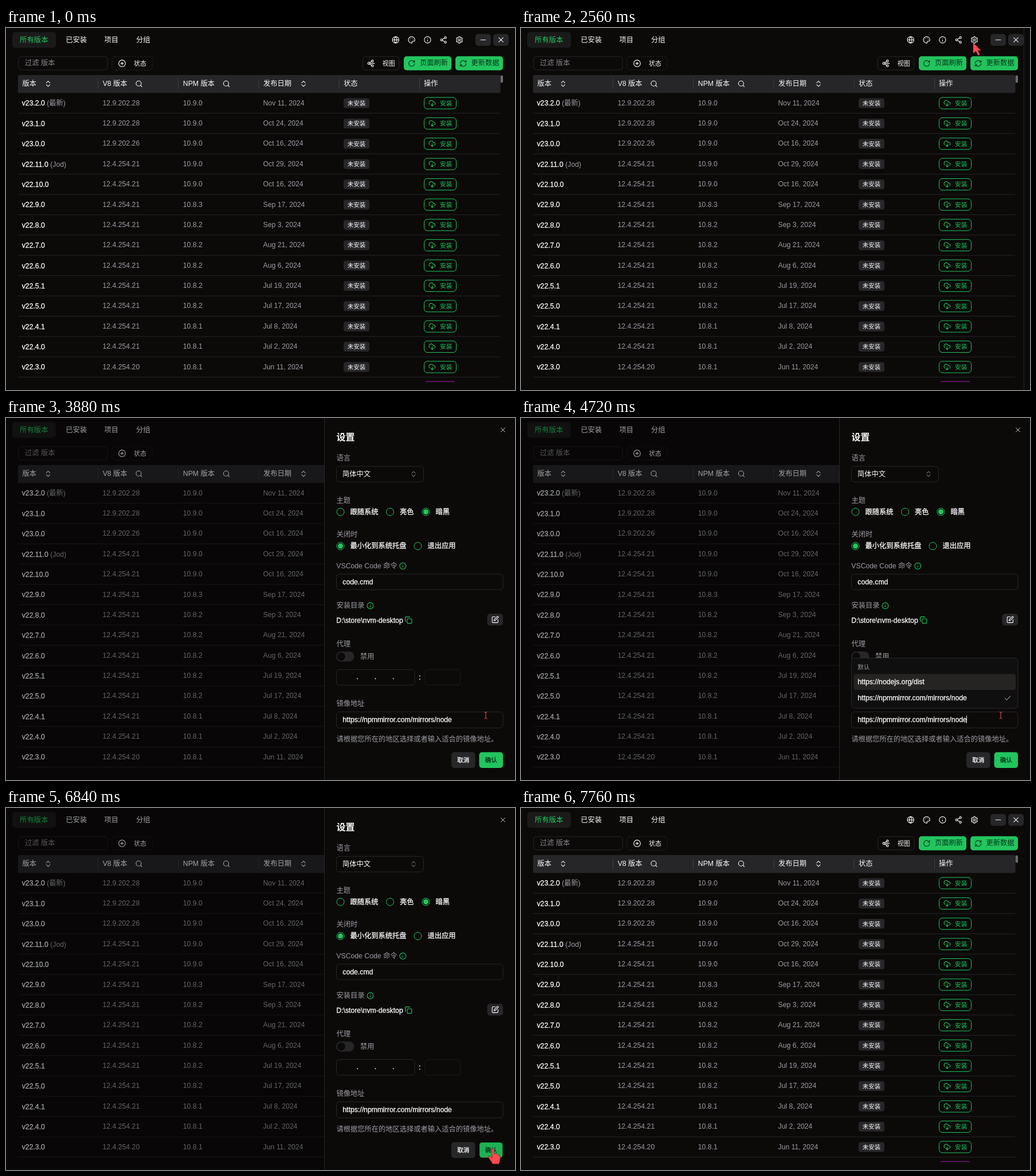
Animation, 888 px wide and 631 px high, one loop 8550 ms. Source, as an HTML page:

```html
<!DOCTYPE html>
<html lang="zh-CN">
<head>
<meta charset="utf-8">
<title>版本管理</title>
<style>
html, body { margin: 0; width: 100%; height: 100%; overflow: hidden; background: #0c0a09; }
svg { display: block; width: 888px; height: 631px; }
text { font-family: "Liberation Sans", "Noto Sans CJK SC", "Noto Sans CJK", sans-serif; white-space: pre; }
.medium { stroke: currentColor; stroke-width: .3px; }
</style>
</head>
<body>
<svg id="stage" viewBox="0 0 888 631" xmlns="http://www.w3.org/2000/svg"></svg>
<script>
const LOOP = 8550, ROW = 35.38, TOP = 113.3;
const BG = '#0c0a09', LINE = '#27272a', GREY = '#9c9ca3', GREEN = '#22c55e', WHITE = '#fafafa', INK = '#07351a';

// Icon outlines on a 24 unit grid
const ICONS = {
  globe: 'M2 12a10 10 0 1 0 20 0a10 10 0 1 0-20 0M2 12h20M12 2a15 15 0 0 0 0 20a15 15 0 0 0 0-20',
  palette: 'M12 2a10 10 0 0 0 0 20c2 0 2.4-1.6 1.5-2.7c-1-1.5 0-3.3 1.7-3.3H18c2.5 0 4-2 4-4.5C22 6 17.5 2 12 2M8 7.5h.1M13.5 6.5h.1M17.5 10.5h.1M6.5 12.5h.1',
  info: 'M2 12a10 10 0 1 0 20 0a10 10 0 1 0-20 0M12 16v-4M12 8h.01',
  share: 'M15 5a3 3 0 1 0 6 0a3 3 0 1 0-6 0M3 12a3 3 0 1 0 6 0a3 3 0 1 0-6 0M15 19a3 3 0 1 0 6 0a3 3 0 1 0-6 0M8.6 13.5l6.8 4M15.4 6.5l-6.8 4',
  gear: 'M10 2h4l.6 3 2 1.1 2.9-1 2 3.5-2.3 2v2.8l2.3 2-2 3.5-2.9-1-2 1.1-.6 3h-4l-.6-3-2-1.1-2.9 1-2-3.5 2.3-2v-2.8l-2.3-2 2-3.5 2.9 1 2-1.1zM9 12a3 3 0 1 0 6 0a3 3 0 1 0-6 0',
  minus: 'M4 12h16',
  cross: 'M5 5l14 14M19 5L5 19',
  plus: 'M2 12a10 10 0 1 0 20 0a10 10 0 1 0-20 0M8 12h8M12 8v8',
  nodes: 'M2 12a3 3 0 1 0 6 0a3 3 0 1 0-6 0M13 5a3 3 0 1 0 6 0a3 3 0 1 0-6 0M13 19a3 3 0 1 0 6 0a3 3 0 1 0-6 0M8 12h14M7 10l7-4M7 14l7 4',
  redo: 'M21 12a9 9 0 1 1-9-9c2.5 0 4.9 1 6.7 2.7L21 8M21 3v5h-5',
  sync: 'M3 12a9 9 0 0 1 9-9a9.75 9.75 0 0 1 6.7 2.7L21 8M21 3v5h-5M21 12a9 9 0 0 1-9 9a9.75 9.75 0 0 1-6.7-2.7L3 16M8 16H3v5',
  sort: 'M6 15l6 6 6-6M6 9l6-6 6 6',
  search: 'M3 11a8 8 0 1 0 16 0a8 8 0 1 0-16 0M21 21l-4.3-4.3',
  cloud: 'M12 12v9M8 17l4 4 4-4M4 14.9A7 7 0 1 1 15.7 8h1.8a4.5 4.5 0 0 1 2.5 8.2',
  copy: 'M10 8h10a2 2 0 0 1 2 2v10a2 2 0 0 1-2 2H10a2 2 0 0 1-2-2V10a2 2 0 0 1 2-2M4 16a2 2 0 0 1-2-2V4a2 2 0 0 1 2-2h10a2 2 0 0 1 2 2',
  edit: 'M12 3H5a2 2 0 0 0-2 2v14a2 2 0 0 0 2 2h14a2 2 0 0 0 2-2v-7M18.4 2.6a2 2 0 0 1 3 3L12.5 14.5l-4 1 1-4z',
  check: 'M3 13l6 6L21 6'
};

const text = (x, cy, s, fill = WHITE, size = 12.25, more = '') =>
  `<text x="${x}" y="${cy + size * .365}" fill="${fill}" color="${fill}" font-size="${size}" ${more}>${s}</text>`;
const medium = (x, cy, s, fill = WHITE, size = 12.25) => text(x, cy, s, fill, size, 'class="medium"');
const box = (x, y, w, h, fill = 'none', stroke = 'none', rx = 5, more = '') =>
  `<rect x="${x}" y="${y}" width="${w}" height="${h}" rx="${rx}" fill="${fill}" stroke="${stroke}" ${more}/>`;
const icon = (name, cx, cy, size = 14, color = WHITE) =>
  `<path d="${ICONS[name]}" transform="translate(${cx - size / 2} ${cy - size / 2}) scale(${size / 24})" fill="none" stroke="${color}" stroke-width="2" stroke-linecap="round" stroke-linejoin="round"/>`;
const line = (x1, y1, x2, y2, color = LINE) =>
  `<path d="M${x1} ${y1}L${x2} ${y2}" stroke="${color}"/>`;
const radio = (cx, cy, label, on) =>
  `<circle cx="${cx}" cy="${cy}" r="6.5" fill="none" stroke="${GREEN}"/>` +
  (on ? `<circle cx="${cx}" cy="${cy}" r="4.6" fill="${GREEN}"/>` : '') +
  medium(cx + 17, cy - .5, label);

const RELEASES = `23.2.0|12.9.202.28|10.9.0|Nov 11, 2024|最新
23.1.0|12.9.202.28|10.9.0|Oct 24, 2024
23.0.0|12.9.202.26|10.9.0|Oct 16, 2024
22.11.0|12.4.254.21|10.9.0|Oct 29, 2024|Jod
22.10.0|12.4.254.21|10.9.0|Oct 16, 2024
22.9.0|12.4.254.21|10.8.3|Sep 17, 2024
22.8.0|12.4.254.21|10.8.2|Sep 3, 2024
22.7.0|12.4.254.21|10.8.2|Aug 21, 2024
22.6.0|12.4.254.21|10.8.2|Aug 6, 2024
22.5.1|12.4.254.21|10.8.2|Jul 19, 2024
22.5.0|12.4.254.21|10.8.2|Jul 17, 2024
22.4.1|12.4.254.21|10.8.1|Jul 8, 2024
22.4.0|12.4.254.21|10.8.1|Jul 2, 2024
22.3.0|12.4.254.20|10.8.1|Jun 11, 2024`.split('\n').map(r => r.split('|'));

function row([ver, v8, npm, date, tag], i) {
  const y = 131 + ROW * i;
  const note = tag ? `<tspan fill="${GREY}" stroke="none"> (${tag})</tspan>` : '';
  return medium(27.7, y, 'v' + ver + note) +
    text(168.5, y - .8, v8, GREY) + text(308.8, y - .8, npm, GREY) + text(448.5, y - .8, date, GREY) +
    box(589, y - 8.5, 45, 17, LINE, 'none', 4) + text(595.7, y, '未安装', WHITE, 10.5) +
    box(729.5, y - 10, 56, 20, 'none', GREEN, 5.5) + icon('cloud', 743.5, y, 13, GREEN) + text(757, y, '安装', GREEN, 10.7) +
    line(21, y + 17.6, 862, y + 17.6, '#242426');
}

function page() {
  const tools = ['globe', 'palette', 'info', 'share', 'gear'];
  return box(11, 7, 76, 27.5, '#1b1a1a') + text(24, 20.5, '所有版本', GREEN, 12.4) +
    text(104.3, 20.5, '已安装') + text(171.5, 20.5, '项目') + text(227, 20.5, '分组') +
    tools.map((n, i) => icon(n, 679.8 + 27.8 * i, 20.7, 13.5)).join('') +
    box(819, 10.5, 27, 20.5, LINE) + icon('minus', 832.5, 20.7, 13) +
    box(850, 10.5, 27, 20.5, LINE) + icon('cross', 863.5, 20.7, 13) +
    box(21.9, 49.9, 155.3, 23.2, 'none', LINE) + text(33, 61, '过滤 版本', '#85858b') +
    box(184.9, 49.9, 70.3, 23.2, 'none', LINE, 5, 'stroke-dasharray="3 2"') + icon('plus', 202.5, 61.7, 14) + text(223, 61.7, '状态', WHITE, 10.9) +
    box(622.5, 49.9, 63.5, 23.2, 'none', LINE) + icon('nodes', 637, 61.7, 14) + text(656.8, 61.7, '视图', WHITE, 10.9) +
    box(694, 49.3, 83, 24.4, GREEN) + icon('redo', 707.7, 61.7, 13.5, INK) + text(722, 61, '页面刷新', INK) +
    box(784, 49.3, 83, 24.4, GREEN) + icon('sync', 797.7, 61.7, 13.5, INK) + text(811.5, 61, '更新数据', INK) +
    box(21, 82, 841.5, 31.3, '#262628', 'none', 2) +
    [160.5, 300.5, 441, 581, 721.5].map(x => line(x, 88, x, 107, '#3d3d45')).join('') +
    text(28.5, 97, '版本') + icon('sort', 73.5, 97.3, 12.5) +
    text(168.7, 97, 'V8 版本') + icon('search', 232, 97.3, 13.5) +
    text(308.8, 97, 'NPM 版本') + icon('search', 384.5, 97.3, 13.5) +
    text(449, 97, '发布日期') + icon('sort', 519, 97.3, 12.5) +
    text(589, 97, '状态') + text(729, 97, '操作') +
    box(862.8, 82.5, 4.2, 13, '#6d6d72', 'none', 2) +
    `<rect id="hover" x="21" width="841.5" height="${ROW}" fill="#27272a" fill-opacity=".4"/>` +
    RELEASES.map(row).join('') +
    `<g clip-path="url(#cut)">${box(729.5, 616.2, 56, 20, 'none', '#a21caf', 5.5)}</g>`;
}

function panel() {
  return `<rect x="555.5" y="-1" width="340" height="633" fill="${BG}" stroke="${LINE}"/>` +
    text(576.5, 33, '设置', WHITE, 16, 'font-weight="700"') + icon('cross', 867, 20.7, 12, '#d4d4d8') +
    text(576.5, 70, '语言', GREY) + box(576.5, 84.3, 152, 27, 'none', LINE) + text(587, 97.3, '简体中文') + icon('sort', 711, 97.7, 12, GREY) +
    text(576.5, 143.3, '主题', GREY) + radio(583.5, 163.6, '跟随系统') + radio(670, 163.6, '亮色') + radio(732.5, 163.6, '暗黑', 1) +
    text(576.5, 202.3, '关闭时', GREY) + radio(583.5, 223.2, '最小化到系统托盘', 1) + radio(718.5, 223.2, '退出应用') +
    text(576.3, 257.3, 'VSCode Code 命令', GREY) + icon('info', 692.3, 258, 13, GREEN) +
    box(576.5, 272.2, 290.5, 27, 'none', LINE) + medium(587.3, 285.2, 'code.cmd') +
    text(576.5, 326.7, '安装目录', GREY) + icon('info', 635.5, 327.3, 13, GREEN) +
    medium(576.3, 352.2, 'D:\\store\\nvm-desktop') + icon('copy', 702.2, 352.2, 13.5, GREEN) +
    box(839.5, 341.3, 27.5, 20.5, LINE) + icon('edit', 853.3, 351.5, 13.5) +
    text(576.5, 393.2, '代理', GREY) + box(576, 407, 31.5, 17.5, LINE, 'none', 8.75) + `<circle cx="584.8" cy="415.7" r="7" fill="${BG}"/>` +
    text(618, 415.3, '禁用', GREY) +
    box(576.5, 438.5, 136.5, 27.3, 'none', LINE) +
    [611.5, 642.7, 674].map(x => medium(x, 450.5, '.')).join('') + medium(720, 452, ':') +
    box(731, 438.5, 61.5, 27.3, 'none', '#1b1a1b') +
    text(576.5, 497.3, '镜像地址', GREY) + box(576.5, 512.2, 290.5, 28, 'none', LINE) +
    medium(587.3, 525.2, 'https://npmmirror.com/mirrors/node') +
    `<path id="caret" d="M777.3 518.5V532" stroke="${WHITE}"/>` +
    text(576.5, 559.5, '请根据您所在的地区选择或者输入适合的镜像地址。', GREY) +
    box(777, 582.5, 41.5, 27.5, LINE) + medium(787.2, 596, '取消', WHITE, 10.6) +
    `<g id="confirm">${box(825.5, 582.5, 41.5, 27.5)}${medium(835.7, 596, '确认', INK, 10.6)}</g>` +
    `<g id="popup">${box(576.5, 418.5, 290.5, 87.5, '#100f0f', LINE)}` +
    `<rect id="item" x="580.5" width="282.5" height="27.8" rx="4" fill="#262423"/>` +
    text(587.3, 434, '默认', GREY, 10.5) + medium(587.3, 459.7, 'https://nodejs.org/dist') +
    medium(587.3, 487.5, 'https://npmmirror.com/mirrors/node') + icon('check', 849, 488, 12, '#d4d4d8') + '</g>';
}

const RED = 'fill="#ff4b50" stroke="#3a1214" stroke-width=".5" stroke-linejoin="round"';
const cursors =
  `<path id="arrow" ${RED} d="M0 0V19L4.7 14.8 8.6 22.5 12 20.9 8.4 13.7H14Z"/>` +
  `<path id="beam" fill="none" stroke="#ff4b50" d="M-2.5-5.500Q0-5.500 0-4Q0-5.500 2.5-5.500M0-4V4.5M-2.5 6Q0 6 0 4.5Q0 6 2.5 6"/>` +
  `<path id="hand" ${RED} d="M-1.5 1.5Q0-1 2 1.5L3 10 6 9.5 9 11 12 12.5 13.5 16 12.5 22 11 27.5H0L-4 21-8 15.5Q-8 13-5.500 13.5L-1 17Z"/>`;

const stage = document.getElementById('stage');
stage.innerHTML = `<defs><clipPath id="cut"><rect y="600" width="888" height="17.3"/></clipPath></defs>
  <rect width="888" height="631" fill="${BG}"/>${page()}
  <rect id="shade" width="888" height="631"/><g id="panel">${panel()}</g><g id="cursor">${cursors}</g>`;
const el = {};
stage.querySelectorAll('[id]').forEach(e => el[e.id] = e);

const clamp = v => Math.min(1, Math.max(0, v));
const span = (t, from, ms) => clamp((t - from) / ms);
const smooth = k => k * k * (3 - 2 * k);

// cubic-bezier(.4, 0, .2, 1)
function ease(x) {
  let lo = 0, hi = 1, s = x;
  for (let i = 0; i < 24; i++) {
    s = (lo + hi) / 2;
    const q = 1 - s;
    if (1.2 * q * q * s + .6 * q * s * s + s * s * s < x) lo = s; else hi = s;
  }
  return 3 * (1 - s) * s * s + s * s * s;
}

// Pointer stops: time, x, y
const PATH = [
  [290, 620, 545], [850, 552, 47], [1430, 552, 47], [1510, 558, 47], [1800, 558, 47],
  [2240, 787, 23], [2440, 787, 23], [2600, 789, 26], [2920, 789, 26], [3280, 505, 283],
  [3320, 505, 283], [3880, 837, 518], [4720, 837, 518], [5360, 772, 486], [6080, 772, 487],
  [6200, 742, 560], [6320, 786, 640], [6480, 850, 636], [6600, 849, 593], [7540, 849, 593], [7680, 896, 596]
];
function pointer(t) {
  const i = PATH.findIndex(p => p[0] > t);
  if (i < 1) return null;
  const [a, b] = [PATH[i - 1], PATH[i]];
  const k = smooth(span(t, a[0], b[0] - a[0]));
  return { x: a[1] + (b[1] - a[1]) * k, y: a[2] + (b[2] - a[2]) * k };
}

const show = (e, on) => e.setAttribute('visibility', on ? 'inherit' : 'hidden');
const scaleAt = (e, s, x, y) => e.setAttribute('transform', `translate(${x * (1 - s)} ${y * (1 - s)}) scale(${s})`);

function draw(t) {
  const open = ease(span(t, 2505, 500)) - ease(span(t, 6960, 300));
  el.panel.setAttribute('transform', `translate(${333 * (1 - open)} 0)`);
  show(el.panel, open > 0);
  el.shade.setAttribute('opacity', .36 * open);

  const p = pointer(t);
  el.cursor.setAttribute('visibility', p ? 'visible' : 'hidden');
  if (p) el.cursor.setAttribute('transform', `translate(${p.x} ${p.y})`);
  const inPanel = open > .5;
  const beam = inPanel && p && p.x > 576 && p.y > 512 && p.y < 540 && t < 5000;
  const hand = inPanel && t > 6400;
  show(el.beam, beam);
  show(el.hand, hand);
  show(el.arrow, !beam && !hand);

  const n = p ? Math.floor((p.y - TOP) / ROW) : -1;
  show(el.hover, open === 0 && p && p.x < 862 && n >= 0);
  el.hover.setAttribute('y', TOP + ROW * Math.max(0, n));

  const pop = ease(span(t, 4240, 160)) - ease(span(t, 5560, 160));
  el.popup.setAttribute('opacity', pop);
  scaleAt(el.popup, .95 + .05 * pop, 721.75, 506);
  el.item.setAttribute('y', p && t > 4700 && p.y < 502 ? 474.3 : 446.3);
  show(el.caret, open > 0 && t > 4280 && t < 5900 && Math.floor((t - 4280) / 500) % 2 === 0);

  const over = hand && p && p.y < 610;
  el.confirm.firstChild.setAttribute('fill', over ? '#1eb053' : GREEN);
  scaleAt(el.confirm, over && t >= 6800 ? .97 : 1, 846.25, 596.25);
}

const start = performance.now();
function tick() {
  draw((performance.now() - start) % LOOP);
  requestAnimationFrame(tick);
}
tick();
</script>
</body>
</html>
```
